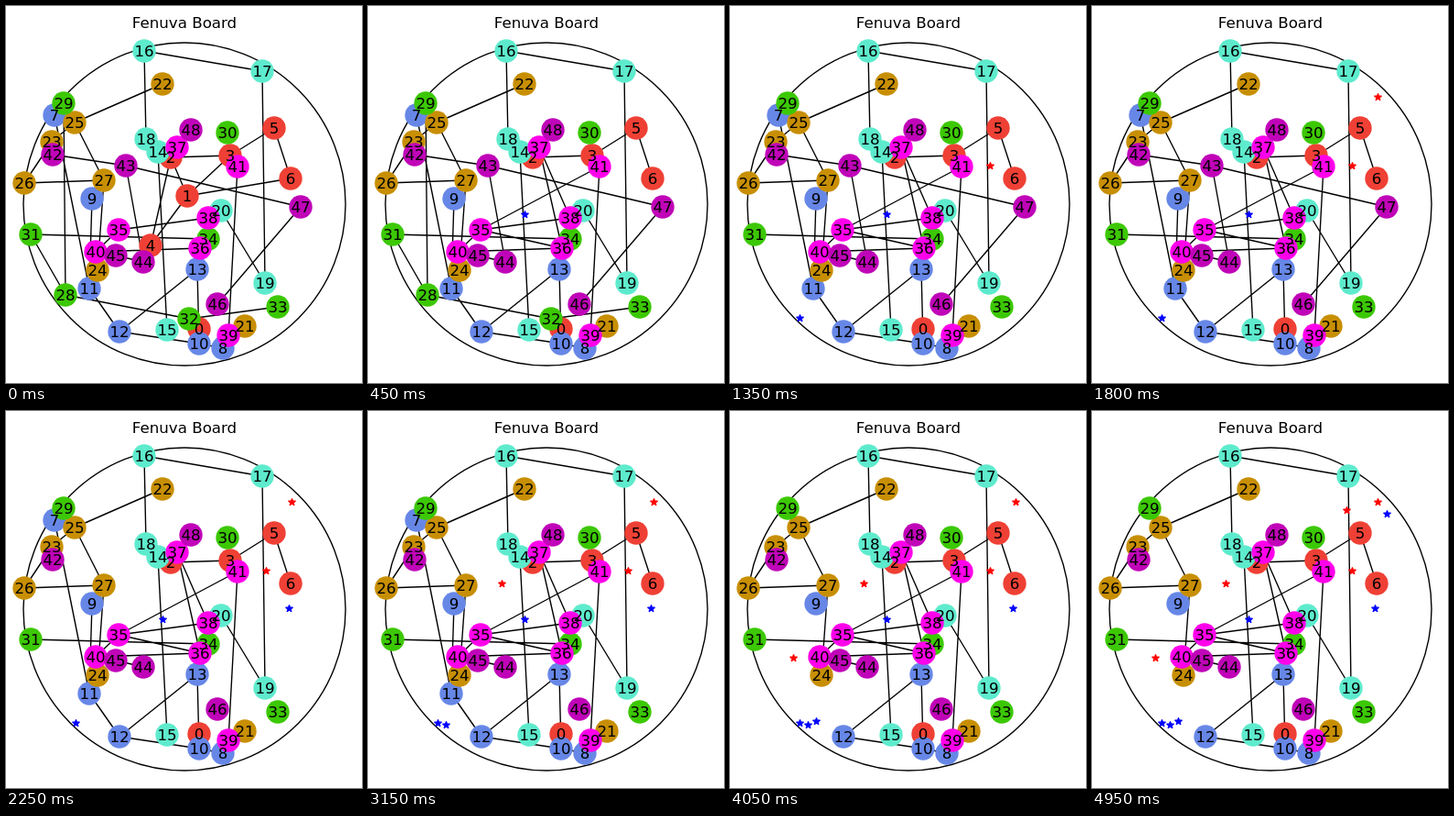
Animation of 389 by 411 pixels, one loop 7.65 s. Source, as an HTML page with a canvas:

```html
<!DOCTYPE html>
<html lang="en">
<head>
<meta charset="utf-8">
<title>Fenuva Board</title>
<style>
  html, body { margin: 0; width: 100%; height: 100%; overflow: hidden; background: #fff; }
  canvas { display: block; }
</style>
</head>
<body>
<canvas id="board" width="389" height="411"></canvas>
<script>
const ctx = document.getElementById('board').getContext('2d');
const LOOP = 7650, STEP = 450;
const CX = 195, CY = 216, R = 176;
const PER_COLOR = 7;
const colors = ['#ef4035', '#6787e7', '#5eebcd', '#c88f04', '#3cc804', '#ff00ea', '#c004b8'];

// Scattered tokens, seven of each colour in turn
const tokens = [
  [211, 352], [198, 207], [180, 165], [245, 163], [158, 261], [293, 133], [311, 188],
  [53, 119], [237, 373], [94, 210], [211, 368], [91, 308], [124, 355], [209, 287],
  [166, 159], [176, 353], [151, 49], [280, 71], [153, 145], [283, 302], [235, 223],
  [261, 349], [171, 85], [50, 148], [100, 288], [75, 127], [20, 193], [107, 190],
  [65, 315], [63, 106], [242, 138], [27, 249], [200, 341], [297, 328], [221, 254],
  [123, 244], [212, 264], [187, 154], [221, 231], [243, 359], [98, 268], [253, 175],
  [51, 162], [131, 174], [150, 279], [120, 272], [231, 325], [322, 219], [202, 135]
].map(([x, y], id) => ({ id, x, y, group: Math.floor(id / PER_COLOR) }));

// Each move places a pawn and may take a pair of tokens
const moves = [
  { at: [171, 227], takes: [1, 4] },
  { at: [284, 174] },
  { at: [76, 340], takes: [28, 32] },
  { at: [312, 99] },
  { at: [309, 215], takes: [43, 47] },
  { at: [146, 188] },
  { at: [85, 342] },
  { at: [69, 269], takes: [7, 11] },
  { at: [94, 338] },
  { at: [278, 108] },
  { at: [322, 112] }
];

const inside = (v, a, b) => v > Math.min(a, b) && v < Math.max(a, b);

// A token blocks a link when it lies in the link's box and close to its line
function blocks(c, a, b) {
  const cross = (b.x - a.x) * (c.y - a.y) - (b.y - a.y) * (c.x - a.x);
  return inside(c.x, a.x, b.x) && inside(c.y, a.y, b.y) && Math.abs(cross) < 0.1 * R * R;
}

function findLinks(live) {
  const links = [];
  for (const a of live) {
    for (const b of live) {
      if (a.id < b.id && a.group === b.group && !live.some(c => blocks(c, a, b))) links.push([a, b]);
    }
  }
  return links;
}

function circle(x, y, r) {
  ctx.beginPath();
  ctx.arc(x, y, r, 0, Math.PI * 2);
}

function star(x, y, color) {
  ctx.beginPath();
  for (let i = 0; i < 10; i++) {
    const r = i % 2 ? 1.6 : 4.17, a = i * Math.PI / 5;
    ctx.lineTo(x + r * Math.sin(a), y - r * Math.cos(a));
  }
  ctx.closePath();
  ctx.fillStyle = ctx.strokeStyle = color;
  ctx.lineJoin = 'bevel';
  ctx.lineWidth = 1.2;
  ctx.fill();
  ctx.stroke();
}

function draw(count) {
  const played = moves.slice(0, count);
  const taken = played.flatMap(move => move.takes || []);
  const live = tokens.filter(token => !taken.includes(token.id));

  ctx.fillStyle = '#fff';
  ctx.fillRect(0, 0, 389, 411);

  ctx.strokeStyle = '#000';
  ctx.lineWidth = 1.39;
  circle(CX, CY, R);
  ctx.stroke();

  ctx.beginPath();
  for (const [a, b] of findLinks(live)) {
    ctx.moveTo(a.x, a.y);
    ctx.lineTo(b.x, b.y);
  }
  ctx.stroke();

  for (const { x, y, group } of live) {
    ctx.fillStyle = colors[group];
    circle(x, y, 12.7);
    ctx.fill();
  }

  played.forEach(({ at: [x, y] }, i) => star(x + 0.5, y + 0.5, i % 2 ? '#f00' : '#00f'));

  ctx.fillStyle = '#000';
  ctx.font = '16.67px "DejaVu Sans", sans-serif';
  ctx.textAlign = 'center';
  ctx.textBaseline = 'alphabetic';
  for (const { id, x, y } of live) ctx.fillText(id, x, y + 6);
  ctx.fillText('Fenuva Board', CX, 24);
}

const start = performance.now();
let last = -1;
function tick() {
  const t = (performance.now() - start) % LOOP;
  const count = Math.min(moves.length, Math.floor(t / STEP));
  if (count !== last) draw(last = count);
  requestAnimationFrame(tick);
}
tick();
</script>
</body>
</html>
```
